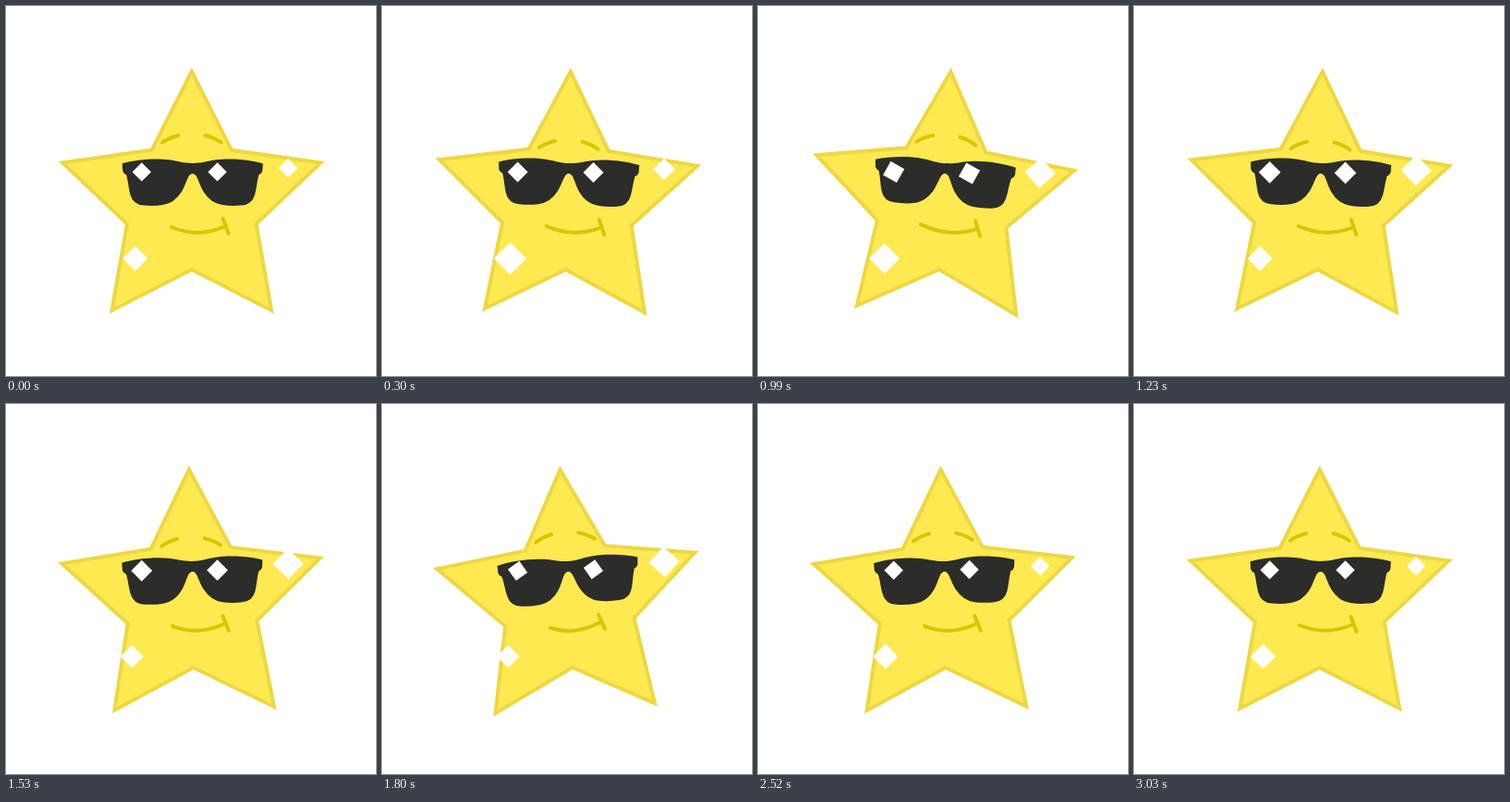
Write an HTML page with a canvas that moves like this. It is 400x400 px and loops after 3.06 s.

```html
<!DOCTYPE html>
<html lang="en">
<head>
<meta charset="utf-8">
<title>Cool star</title>
<style>
html, body { margin: 0; width: 100%; height: 100%; overflow: hidden; background: #fff; }
canvas { display: block; width: 400px; height: 400px; }
</style>
</head>
<body>
<canvas id="stage" width="400" height="400"></canvas>
<script>
const ctx = document.getElementById('stage').getContext('2d');
const LOOP = 3060, STEP = 30, BEAT = 900, REST = 2400, END = 3000;
const RAD = Math.PI / 180;
const LINE = '#dac500';

const linear = k => k;
const smooth = k => (1 - Math.cos(Math.PI * k)) / 2;
const phase = (t, from, to) => Math.min(1, Math.max(0, (t - from) / (to - from)));
const hump = (t, from, to) => Math.sin(Math.PI * phase(t, from, to));

// 0 -> a in the first beat, a -> b in the second, then back to 0
function swing(t, a, b, end, ease) {
  return a * ease(phase(t, 0, BEAT)) +
    (b - a) * ease(phase(t, BEAT, 2 * BEAT)) -
    b * ease(phase(t, 2 * BEAT, end));
}

// Right halves, drawn on both sides of a mirror line
const lens = new Path2D('M-.5 170C10.5 170 14.5 167.7 25.5 166.3C40 164.3 62 166 76 170.2' +
  'L75.6 178Q75 181 71.6 182.5C69.5 190 69.3 197 67.3 204Q64.3 214.8 53 215.5' +
  'Q42 216.5 32 215Q19.5 213 12 201C8 194.5 6.5 188 3.8 183.5Q2 181 -.5 181Z');
const brow = new Path2D('M14.6 140Q23.5 141.9 31.9 147.6');

function starPath() {
  const path = new Path2D();
  for (let i = 0; i < 10; i++) {
    const r = i % 2 ? 73.4 : 146.8, a = i * 36 * RAD;
    path.lineTo(200.7 + r * Math.sin(a), 213.6 - 0.973 * r * Math.cos(a));
  }
  path.closePath();
  return path;
}
const star = starPath();

function turned(cx, cy, deg, paint) {
  ctx.save();
  ctx.translate(cx, cy);
  ctx.rotate(deg * RAD);
  ctx.translate(-cx, -cy);
  paint();
  ctx.restore();
}

function mirrored(x, y, paint) {
  for (const side of [1, -1]) {
    ctx.save();
    ctx.translate(x, y);
    ctx.scale(side, 1);
    paint();
    ctx.restore();
  }
}

function diamond(x, y, r, deg) {
  turned(x, y, deg + 45, () => {
    const side = r * Math.SQRT2;
    ctx.fillStyle = '#fff';
    ctx.fillRect(x - side / 2, y - side / 2, side, side);
  });
}

function drawStar() {
  ctx.fillStyle = '#ffe951';
  ctx.fill(star);
  ctx.strokeStyle = '#ebd843';
  ctx.stroke(star);
}

function drawSmile(lean, tilt) {
  const x = 237.5, y = 238 + 2.6 * lean;
  ctx.beginPath();
  ctx.moveTo(178.8 - 3 * lean, 239 - 2.9 * lean);
  ctx.quadraticCurveTo(207.5, 251.3, x, y);
  ctx.stroke();
  turned(x, y, tilt - 20.5, () => {
    ctx.beginPath();
    ctx.moveTo(x, y - 8.6);
    ctx.lineTo(x, y + 8.6);
    ctx.stroke();
  });
}

function drawSparkles(t, lean, tilt) {
  const raise = hump(t, 0, 2000);
  const spin = 90 * (smooth(phase(t, 350, 1230)) + smooth(phase(t, 1640, REST)));
  for (const side of [-1, 1]) {
    diamond(187.6 + 40.9 * side, 179.4 + 0.8 * (lean * side + raise), 10.2 + 1.8 * raise, spin);
  }
  diamond(305, 175.2 + swing(t, 5.5, -4.5, REST, smooth), 10.2 + swing(t, 6.4, 6.4, REST, smooth), tilt);
  const low = 13.5 + 5.8 * hump(t, 0, REST / 2) - 1.3 * hump(t, REST / 2, REST);
  diamond(139.6 - 3.4 * hump(t, 0, END), 273, low, 0);
}

function draw(t) {
  const tilt = swing(t, 4.2, -3.6, END, linear), lean = tilt / 3.5;
  const drop = 8.5 * hump(t % BEAT, 0, BEAT) ** 2 * (t < 2 * BEAT);
  ctx.fillStyle = '#fff';
  ctx.fillRect(0, 0, 400, 400);
  ctx.lineWidth = 4;

  ctx.lineCap = 'butt';
  turned(200.5, 200.5, tilt, drawStar);
  ctx.lineCap = 'round';
  ctx.strokeStyle = LINE;
  turned(200.5, 190, tilt, () => {
    ctx.fillStyle = '#2c2c2a';
    mirrored(201.7, 0, () => ctx.fill(lens));
    mirrored(200.8, drop, () => ctx.stroke(brow));
  });
  drawSmile(lean, tilt);
  drawSparkles(t, lean, tilt);
}

const start = performance.now();
function tick() {
  const t = (performance.now() - start) % LOOP;
  draw(Math.floor(t / STEP) * STEP);
  requestAnimationFrame(tick);
}
tick();
</script>
</body>
</html>
```
